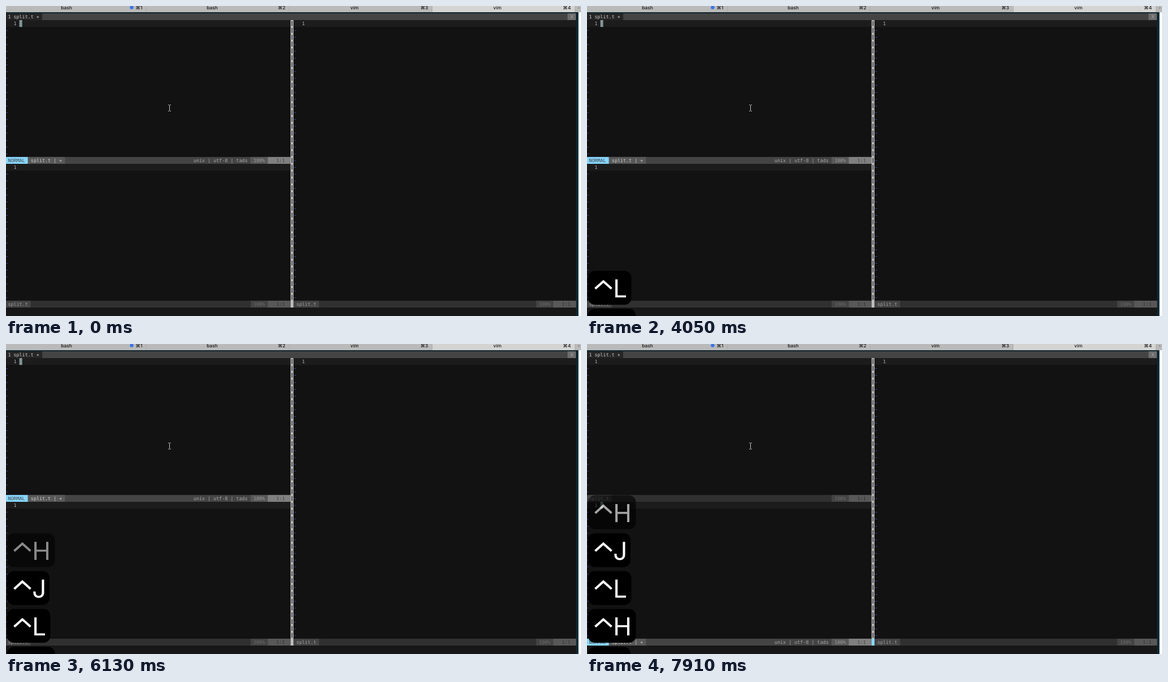
An HTML page that plays this animation: 1018x550 px, repeating every 8000 ms.

```html
<!DOCTYPE html>
<html lang="en">
<head>
<meta charset="utf-8">
<title>Split navigation</title>
<style>
  html, body { margin: 0; width: 100%; height: 100%; overflow: hidden; background: #121212; }
  svg { display: block; width: 1018px; height: 550px; text-rendering: geometricPrecision; }
  .mono { font: 8.4px "DejaVu Sans Mono", monospace; white-space: pre; }
  .tab { font: 500 8.4px Inter, "DejaVu Sans", sans-serif; text-anchor: middle; }
  .key { font: 400 44px Inter, sans-serif; }
</style>
</head>
<body>
<svg id="stage" viewBox="0 0 1018 550"></svg>
<script>
const LOOP = 8000, COL = 5.055, ROW = 12.143, LEFT = -1.65;
const BLUE = '#87d7ff';
const stage = document.getElementById('stage');
const colX = c => LEFT + c * COL;
const rowY = r => 25 + (r - 1) * ROW;

function add(parent, tag, attrs = {}, text) {
  const el = document.createElementNS('http://www.w3.org/2000/svg', tag);
  for (const name in attrs) el.setAttribute(name, attrs[name]);
  if (text !== undefined) el.textContent = text;
  return parent.appendChild(el);
}
const rect = (parent, x, y, width, height, fill, rx = 0) =>
  add(parent, 'rect', { x, y, width, height, fill, rx });

const cells = (parent, col, row, count, fill, rows = 1) =>
  rect(parent, colX(col), rowY(row), count * COL, rows * ROW, fill);

function write(parent, col, row, text, fill) {
  add(parent, 'text', { class: 'mono', x: colX(col), y: rowY(row) + 9.1, fill }, text);
}
function segment(parent, col, row, text, bg, fg) {
  cells(parent, col, row, text.length, bg);
  write(parent, col + text.search(/\S/), row, text.trim(), fg);
}

function drawTabs() {
  rect(stage, 0, 0, 1018, 11, '#b9bab9');
  rect(stage, 754, 0, 253, 11, '#d4d4d3');
  for (const x of [248, 501, 754, 1007]) rect(stage, x, 0, 1, 11, '#adaeae');
  ['bash', 'bash', 'vim', 'vim'].forEach((name, i) => {
    const x = [107, 365, 617, 870][i];
    add(stage, 'text', { class: 'tab', x, y: 6, fill: '#161616' }, name);
    add(stage, 'text', { class: 'tab', x: 235.5 + 252.5 * i, y: 6, fill: '#161616' }, '⌘' + (i + 1));
  });
  add(stage, 'circle', { cx: 222.5, cy: 2.5, r: 3.2, fill: '#3b74ea' });
  add(stage, 'text', { class: 'tab', x: 1014, y: 6, fill: '#888' }, '+');
  rect(stage, 0, 11, 1013, 2, '#10262f');
  rect(stage, 1009, 11, 4.5, 539, '#0b2631');
  rect(stage, 1013.5, 11, 4.5, 539, '#fff');
}

function drawStatus(parent, col, row, width, active) {
  const end = col + width;
  if (active) {
    cells(parent, col, row, width, '#444444');
    segment(parent, col, row, ' NORMAL ', BLUE, '#444444');
    segment(parent, col + 8, row, ' split.t | + ', '#585858', '#d0d0d0');
    write(parent, end - 34, row, 'unix | utf-8 | tads', '#a8a8a8');
  } else {
    cells(parent, col, row, width, '#303030');
    segment(parent, col, row, ' split.t ', '#444444', '#9e9e9e');
  }
  segment(parent, end - 14, row, ' 100% ', active ? '#585858' : '#444444', active ? '#9e9e9e' : '#6c6c6c');
  segment(parent, end - 8, row, '   1:1  ', active ? '#808080' : '#585858', active ? '#444444' : '#303030');
}

function drawPane({ col, top, bottom, width }) {
  cells(stage, col, top, width, '#1c1c1c');
  write(stage, col + 3, top, '1', '#b4b4b4');
  for (let r = top + 1; r < bottom; r++) write(stage, col, r, '~', '#4a58c0');
  const idle = add(stage, 'g'), focus = add(stage, 'g');
  drawStatus(idle, col, bottom, width, false);
  drawStatus(focus, col, bottom, width, true);
  cells(focus, col + 5, top, 1, '#839496');
  return { idle, focus };
}

rect(stage, 0, 0, 1018, 550, '#121212');
rect(stage, 0, 535, 1009, 15, '#171717');
cells(stage, 0, 0, 200, '#444444');
segment(stage, 0, 0, ' 1 split.t + ', '#262626', '#d0d0d0');
segment(stage, 197, 0, ' X ', '#6c6c6c', '#a8a8a8');
drawTabs();

const panes = [
  { col: 0, top: 1, bottom: 21, width: 100 },
  { col: 0, top: 22, bottom: 42, width: 100 },
  { col: 101, top: 1, bottom: 42, width: 99 }
].map(drawPane);

cells(stage, 100, 1, 1, '#bcbcbc', 42);
for (let r = 1; r < 42; r++) rect(stage, 505.7, rowY(r) + 1.6, 1.4, 9, '#262626');
cells(panes[1].focus, 100, 42, 1, BLUE);
stage.append(panes[1].focus);

// Text pointer
add(stage, 'path', {
  d: 'M287 175.5h1.5l1 1l1-1h1.5M287 186.5h1.5l1-1l1 1h1.5M289.5 176.5v9',
  fill: 'none', stroke: '#d0d0d0'
});

// Focus moves: [time, pane]
const moves = [[0, 0], [1200, 1], [3000, 2], [4050, 0], [4650, 1], [5090, 2],
  [5990, 0], [6420, 1], [6720, 2], [7310, 0], [7760, 1]];

// Key presses: [time, letter, fade time, faded opacity, end time]
const presses = [
  [1050, 'J', 3150, 0.5, 3300], [3000, 'L', 4950, 0.62, 5090], [4050, 'H', 6130, 0.5, 6280],
  [4650, 'J', 6570, 0.68, 6720], [5090, 'L', 7020, 0.6, 7170], [5990, 'H', 7910, 0.62, LOOP],
  [6420, 'J'], [6720, 'L'], [7310, 'H'], [7760, 'J']
].map(([start, letter, fade = LOOP, faded = 1, end = LOOP]) => {
  const group = add(stage, 'g');
  rect(group, 2, 0, { J: 75, L: 76.5, H: 84.5 }[letter], 60, '#000', 12);
  add(group, 'path', { d: 'M14.5 31.5L29 18.5L43.5 31.5', fill: 'none', stroke: '#fff', 'stroke-width': 4 });
  add(group, 'text', { class: 'key', x: 46.3, y: 47.3, fill: '#fff' }, letter);
  return { group, start, fade, faded, end };
});

const show = (el, on) => el.setAttribute('visibility', on ? 'visible' : 'hidden');

function render(t) {
  const current = moves.filter(m => m[0] <= t).pop()[1];
  panes.forEach((pane, i) => {
    show(pane.idle, i !== current);
    show(pane.focus, i === current);
  });
  const pressed = presses.filter(p => p.start <= t).length;
  presses.forEach(({ group, start, fade, faded, end }, i) => {
    show(group, t >= start && t < end);
    group.setAttribute('opacity', t < fade ? 1 : faded);
    group.setAttribute('transform', `translate(0 ${537.3 - 67.2 * (pressed - 1 - i)})`);
  });
}

const origin = performance.now();
function tick() {
  render((performance.now() - origin) % LOOP);
  requestAnimationFrame(tick);
}
tick();
</script>
</body>
</html>
```
